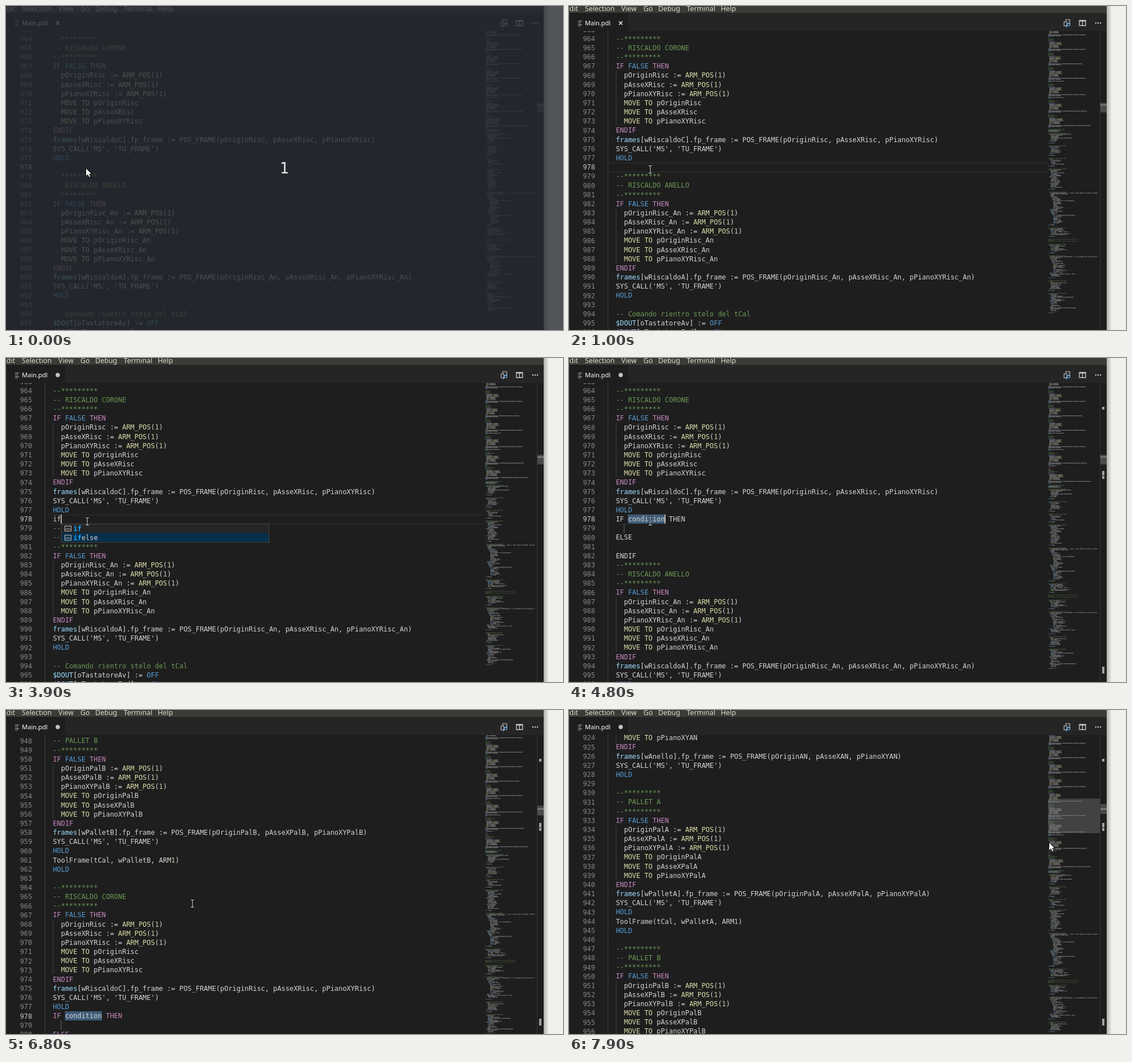
An HTML page with a canvas that plays this animation: 980x571 px, repeating every 8 s.

```html
<!DOCTYPE html>
<html lang="en">
<head>
<meta charset="utf-8">
<title>Editor snippet</title>
<style>
html, body { margin: 0; width: 100%; height: 100%; overflow: hidden; background: #1e1e1e; }
canvas { display: block; }
</style>
</head>
<body>
<canvas id="stage" width="980" height="571"></canvas>
<script>
const ctx = document.getElementById('stage').getContext('2d');
const LOOP = 8000, FIRST = 855, CARET_LINE = 978;
const ROW = 16.165, COL = 7.18, LEFT = 82.4, TOP = 44;
const MAP_X = 843.5, MAP_ROW = 1.7, MAP_COL = 0.85;
const MONO = '"DejaVu Sans Mono", monospace', SANS = '"Noto Sans", sans-serif';
const PLAIN = '#d4d4d4';

let seed = 11;
const rand = () => (seed = seed * 16807 % 2147483647) / 2147483647;

// ---- document ----
function block(title, frame, suffix, tool) {
  const [o, a, p] = ['pOrigin', 'pAsseX', 'pPianoXY'].map(s => s + suffix);
  return ['--*********', '-- ' + title, '--*********', 'IF FALSE THEN',
    ...[o, a, p].map(v => `  ${v} := ARM_POS(1)`),
    ...[o, a, p].map(v => `  MOVE TO ${v}`),
    'ENDIF', `frames[${frame}].fp_frame := POS_FRAME(${o}, ${a}, ${p})`,
    "SYS_CALL('MS', 'TU_FRAME')", 'HOLD',
    ...(tool ? [`ToolFrame(tCal, ${frame}, ARM1)`, 'HOLD'] : []), ''];
}

const words = n => Array.from({ length: n }, () => rand() < 0.16 ? ' ' : 'x').join('');

// Distant routines, seen only in the overview on the right
function routine(rows, width, nested) {
  const out = ['', '-- ' + words(12) + ' MOVE TO ' + words(13)];
  if (nested) out.push('   IF ' + words(45) + ' HOLD ' + words(45));
  for (let i = 0; i < rows; i++) {
    const indent = nested ? 3 + Math.min(i % 16, 7) : i % 7 ? 5 : 2;
    const head = ['', '', 'IF ', 'HOLD ', 'MOVE TO ', '$DOUT '][Math.floor(rand() * 6)];
    const wide = rand() < 0.08 ? 30 : 0;
    out.push(' '.repeat(indent) + head + words(4 + rand() * width + wide));
  }
  return [...out, '', 'HOLD ' + words(8), ''];
}

const before = [
  ...block('CORONA A', 'wCoronaA', 'CorA'), ...block('CORONA B', 'wCoronaB', 'CorB'),
  ...block('CORONA C', 'wCoronaC', 'CorC'), ...block('CORONA D', 'wCoronaD', 'CorD'),
  ...block('ANELLO', 'wAnello', 'AN'),
  ...block('PALLET A', 'wPalletA', 'PalA', true),
  ...block('PALLET B', 'wPalletB', 'PalB', true),
  ...block('RISCALDO CORONE', 'wRiscaldoC', 'Risc').slice(0, -1)
];
const after = [
  ...block('RISCALDO ANELLO', 'wRiscaldoA', 'Risc_An'),
  '-- Comando rientro stelo del tCal',
  '$DOUT[oTastatoreAv] := OFF', '$DOUT[oTastatoreInd] := ON',
  ...routine(8, 18), ...routine(8, 18), ...routine(6, 22), ...routine(19, 18),
  ...routine(31, 14, true), ...routine(7, 30),
  '', '--' + '*'.repeat(60), '-- ' + words(8), '--' + '*'.repeat(60), '',
  ...routine(7, 30), ...routine(20, 20, true), ...routine(8, 24), ...routine(18, 24)
];
const snippet = ['IF condition THEN', '', 'ELSE', '', 'ENDIF'];

// ---- drawing helpers ----
const RULES = [
  [/^--/, '#6a9955'], [/^(IF|THEN|ELSE|ENDIF)$/, '#c586c0'],
  [/^(FALSE|HOLD|ON|OFF)$/, '#569cd6'], [/^(ARM_POS|MOVE TO)$/, '#dcdcaa'],
  [/^(frames|\$DOUT)$/, '#9cdcfe'], [/^\d+$/, '#b5cea8']
];
const TOKEN = /--.*|\b(?:IF|THEN|ELSE|ENDIF|FALSE|HOLD|ON|OFF|ARM_POS|MOVE TO)\b|^frames\b|\$DOUT|\b\d+\b|[^\s]/g;

function eachChar(line, plain, draw) {
  for (const m of line.matchAll(TOKEN)) {
    const rule = !plain && RULES.find(r => r[0].test(m[0]));
    ctx.fillStyle = rule ? rule[1] : PLAIN;
    [...m[0]].forEach((c, i) => c !== ' ' && draw(c, m.index + i));
  }
}

function rect(x, y, w, h, color) {
  ctx.fillStyle = color;
  ctx.fillRect(x, y, w, h);
}

function text(s, x, y, color, font) {
  ctx.font = font;
  ctx.fillStyle = color;
  ctx.fillText(s, x, y);
}

function mono(s, x, y, color, weight = '') {
  ctx.font = `${weight} 11.93px ${MONO}`;
  ctx.fillStyle = color;
  [...s].forEach((c, i) => ctx.fillText(c, x + i * COL, y));
}

function stroke(d, color, width = 1) {
  ctx.strokeStyle = color;
  ctx.lineWidth = width;
  ctx.stroke(new Path2D(d));
}

function dot(x, y, r, color) {
  ctx.fillStyle = color;
  ctx.beginPath();
  ctx.arc(x, y, r, 0, 7);
  ctx.fill();
}

// ---- state over time ----
function mouseAt(t) {
  const path = [[6200, 143, 288], [6600, 318, 329], [6800, 328, 341],
    [7200, 328, 341], [7800, 838, 238], [7900, 845, 234]];
  let p = path[0];
  for (const q of path) {
    if (t < q[0]) {
      const k = Math.max(0, (t - p[0]) / (q[0] - p[0]));
      return [p[1] + (q[1] - p[1]) * k, p[2] + (q[2] - p[2]) * k];
    }
    p = q;
  }
  return [p[1], p[2]];
}

const scrollAt = t => 127.6 * [6700, 6800, 7000, 7200, 7300].filter(s => t >= s).length;
const caretOn = t => [500, 1000, 2000, 4400, 4800, 5300, 5800, 6300].filter(s => t >= s).length % 2 === 1;

// ---- parts ----
function chrome(edited) {
  rect(0, 0, 946, 12, '#3c3b37');
  rect(0, 12, 946, 32, '#252526');
  rect(0, 12, 104, 32, '#1e1e1e');
  const menu = { Edit: -6, Selection: 28, View: 92, Go: 131, Debug: 157, Terminal: 207, Help: 267 };
  for (const name in menu) text(name, menu[name], 8.7, '#dfdbd2', `12.3px ${SANS}`);
  stroke('M16 26.5h7M16 29.5h5M16 32.5h7M16 35h5', '#b8b8b8');
  text('Main.pdl', 28, 34, '#fff', `11px ${SANS}`);
  if (edited) dot(91, 30, 3.7, '#c5c5c5');
  else stroke('M88 27l6 6M94 27l-6 6', '#e8e8e8', 1.6);
  stroke('M874 28v-4h7v7h-3M871 28h5v7h-5z', '#c5c5c5', 1.2);
  stroke('M879 30a2.5 2.5 0 1 0 .1 0M877 34l-3 3', '#75beff', 1.2);
  stroke('M898 25.5h11v9h-11zM903.5 25v10M898 26.5h11', '#d0d0d0', 1.3);
  for (const x of [927, 931, 935]) dot(x, 30, 1.2, '#d0d0d0');
}

function popup(x, typed, items, selected) {
  const y = 292, h = items.length * ROW;
  rect(x, y, 366, h, '#252526');
  rect(x, y + selected * ROW, 366, ROW, '#062f4a');
  ctx.strokeStyle = '#454545';
  ctx.lineWidth = 1;
  ctx.strokeRect(x + 0.5, y + 0.5, 365, h);
  items.forEach((item, i) => {
    const c = y + (i + 0.5) * ROW + 0.5;
    ctx.strokeStyle = '#c5c5c5';
    ctx.strokeRect(x + 6.5, c - 4.5, 11, 9);
    text('abc', x + 7.6, c + 2, '#c5c5c5', `5.5px ${SANS}`);
    mono(typed, x + 21.5, c + 4.2, '#18a3ff', 'bold');
    mono(item.slice(typed.length), x + 21.5 + typed.length * COL, c + 4.2, PLAIN);
  });
}

function editor(lines, t, scroll) {
  const rowY = n => 57.5 + (n - 964) * ROW + scroll;
  const caretY = rowY(CARET_LINE) - 8, expanded = t >= 4800;
  rect(68, TOP, 1, 527, '#404040');
  if (expanded) rect(LEFT + 3 * COL - 0.3, caretY, 9 * COL + 0.5, 16, '#405c79');
  else {
    rect(69, caretY, 774, 1, '#303030');
    rect(69, caretY + 16, 774, 1, '#303030');
  }
  lines.forEach((line, i) => {
    const n = FIRST + i, y = rowY(n);
    if (y < TOP - 10 || y > 582) return;
    mono(String(n), 24.4, y + 4.5, n === CARET_LINE ? '#c6c6c6' : '#858585');
    if (line.startsWith('  ')) rect(82.5, y - 8, 1, ROW + 0.2, '#404040');
    const pending = expanded && t < 4900 && n >= CARET_LINE && n < CARET_LINE + 5;
    eachChar(line, pending, (c, col) => ctx.fillText(c, LEFT + col * COL, y + 4.3));
  });
  if (expanded) rect(96.5, caretY + ROW, 1, ROW, '#707070');
  if (caretOn(t)) {
    const col = expanded ? 12 : t >= 2800 ? 2 : t >= 2700 ? 1 : 0;
    rect(LEFT + col * COL - 0.4, caretY, 1.7, 16, '#c8c8c6');
  }
}

function minimap(lines, scroll, hover, edited) {
  const top = 963.2 - scroll / ROW, first = 892.3 - 0.874 * scroll / ROW;
  rect(843, TOP, 103, 527, '#1e1e1e');
  ctx.globalAlpha = 0.55;
  lines.forEach((line, i) => {
    const y = TOP + (FIRST + i - first) * MAP_ROW;
    if (y < TOP - 2 || y > 571) return;
    eachChar(line, false, (c, col) => {
      if (col < 106) ctx.fillRect(MAP_X + col * MAP_COL, y, MAP_COL, c === '*' ? 0.7 : 1.15);
    });
  });
  ctx.globalAlpha = 1;
  if (hover) rect(843, TOP + (top - first) * MAP_ROW, 91, 61, 'rgba(121,121,121,.4)');
  rect(934, TOP, 1, 527, '#343434');
  rect(935, 170.5 - scroll * 0.007, 11, 17, '#4a4a4a');
  rect(935, 173.5, 11, 2, '#858585');
  if (edited) for (const [y, h] of [[86, 5], [199, 8], [208, 5], [544, 12]]) rect(938, y, 4, h, '#a0a0a0');
}

function desktop() {
  rect(946, 0, 34, 571, '#f1f0ec');
  const shade = ctx.createLinearGradient(946, 0, 955, 0);
  shade.addColorStop(0, 'rgba(0,0,0,.28)');
  shade.addColorStop(1, 'rgba(0,0,0,0)');
  rect(946, 0, 9, 571, shade);
}

function pointer(x, y, arrow) {
  ctx.save();
  ctx.translate(x, y);
  if (arrow) {
    const p = new Path2D('M0 0v13l3-3 2.3 5 2-1-2.3-4.7h4z');
    ctx.strokeStyle = '#000';
    ctx.lineWidth = 1.6;
    ctx.stroke(p);
    ctx.fillStyle = '#fff';
    ctx.fill(p);
  } else {
    const d = 'M-3-6.5h2.2l.8.6.8-.6H3M0-6v12M-3 6.5h2.2l.8-.6.8.6H3';
    stroke(d, '#000', 2.4);
    stroke(d, '#e8e8e8', 1.1);
  }
  ctx.restore();
}

function draw(t) {
  const typed = t < 2700 ? '' : t < 2800 ? 'i' : 'if';
  const expanded = t >= 4800, scroll = scrollAt(t), [mx, my] = mouseAt(t);
  const lines = [...before, ...(expanded ? snippet : [typed]), ...after];
  const hover = mx > 843;

  rect(0, 0, 980, 571, '#1e1e1e');
  ctx.save();
  ctx.beginPath();
  ctx.rect(0, TOP, 946, 527);
  ctx.clip();
  editor(lines, t, scroll);
  minimap(lines, scroll, hover, expanded);
  if (typed === 'i') {
    popup(89, 'i', [102, 103, 104, 11, 110, 111, 112, 113, 114, 115, 116, 117].map(n => 'i' + n), 0);
  } else if (typed && !expanded) {
    popup(97, 'if', ['if', 'ifelse'], t < 3400 ? 0 : 1);
  }
  ctx.restore();
  chrome(t >= 2700);
  rect(0, 12, 1, 559, '#343434');
  desktop();

  if (t < 100) {
    rect(0, 0, 980, 571, 'rgba(36,41,49,.78)');
    ctx.textAlign = 'center';
    text('1', 490, 295, '#e8e8e8', '26px "DejaVu Sans", sans-serif');
    ctx.textAlign = 'left';
    pointer(141, 286.5, true);
  } else pointer(mx, my, hover);
}

let shown = -1;
const start = performance.now();
function tick() {
  const t = Math.floor((performance.now() - start) % LOOP / 100) * 100;
  if (t !== shown) draw(shown = t);
  requestAnimationFrame(tick);
}
tick();
</script>
</body>
</html>
```
